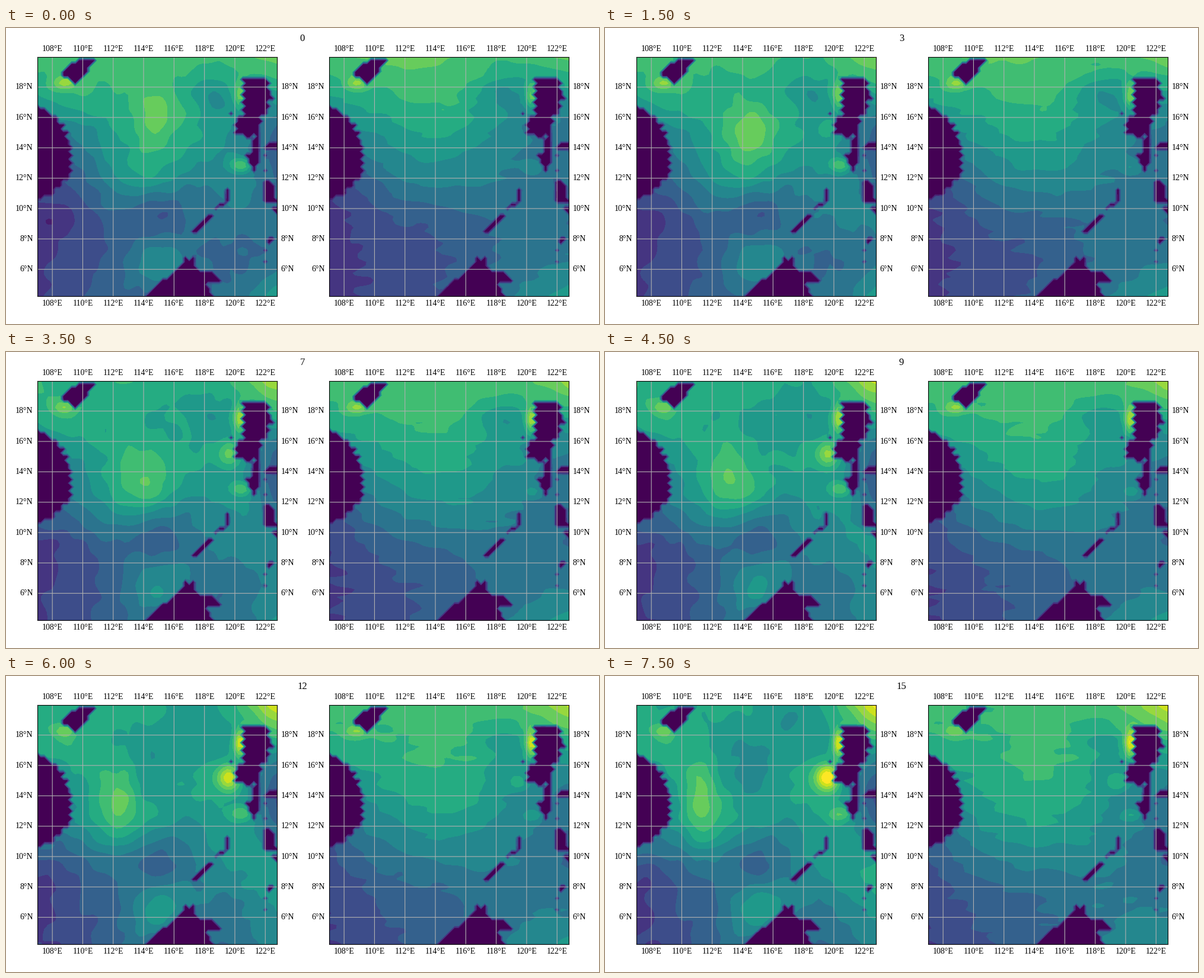
A matplotlib script for the animation above (8 s loop, 1000x500 px).

```python
import numpy as np
import matplotlib.pyplot as plt
from matplotlib.animation import FuncAnimation
from matplotlib.path import Path

plt.rcParams["font.family"] = "Liberation Serif"
FRAMES, STEP_MS = 16, 500
N = 64                                   # quarter-degree samples per side
X0, X1, Y0, Y1 = 52.5, 456.5, 48.5, 452.5
SHIFT = 492                              # distance between the two panels
DEG = (X1 - X0) / 15.75
PAD = 6.94

xs, ys = np.linspace(X0, X1, N), np.linspace(Y0, Y1, N)
gx, gy = np.meshgrid(xs, ys)
LEVELS = [-1, *range(1, 14), 15]
COLORS = plt.get_cmap("viridis")(np.linspace(0, 1, 14))


def land(*corners, tooth=0):
    """Polygon mask; every other row is shifted to give a saw-tooth coast."""
    px = gx + tooth * (np.arange(N) % 2)[:, None]
    inside = Path(corners).contains_points(np.column_stack([px.ravel(), gy.ravel()]))
    return inside.reshape(N, N)


def land_mask():
    mask = land((40, 120), (85, 148), (104, 172), (112, 205), (112, 248),
                (80, 281), (40, 296), tooth=6)
    mask |= land((395, 85), (439, 85), (441, 104), (446, 119), (437, 143),
                 (428, 150), (424, 172), (427, 180), (398, 185), (384, 176),
                 (384, 156), (396, 144), tooth=-6)
    mask |= land((95, 73), (118, 54), (150, 54), (138, 72), (117, 95), (95, 80))
    mask |= land((421, 176), (428, 176), (426, 232), (418, 242), (401, 214),
                 (414, 214))
    mask |= land((434, 202), (444, 194), (458, 193), (458, 209))
    mask |= land((436, 258), (448, 257), (458, 294), (434, 293))
    mask |= land((446, 304), (458, 302), (458, 317))
    mask |= land((442, 370), (443, 354), (458, 354))
    mask |= land((313, 345), (335, 320), (349, 311), (347, 321), (325, 343))
    mask |= land((232, 454), (300, 395), (300, 380), (309, 391), (315, 386),
                 (325, 410), (347, 411), (361, 427), (338, 430), (350, 454))
    islets = [(418, 190), (380, 145), (437, 215), (437, 241), (437, 376),
              (437, 395), (354, 305), (360, 299), (367, 299)]
    islets += [(373, y) for y in range(273, 293, 6)]
    for x, y in islets:
        mask[abs(ys - y).argmin(), abs(xs - x).argmin()] = True
    return mask


def spline(n):
    """Matrix taking n even knots to N samples of a natural cubic spline."""
    k, x = np.linspace(0, 1, n), np.linspace(0, 1, N)
    cube = lambda a: abs(a[:, None] - k) ** 3
    line = lambda a: np.column_stack([np.ones_like(a), a])
    system = np.block([[cube(k), line(k)], [line(k).T, np.zeros((2, 2))]])
    return np.hstack([cube(x), line(x)]) @ np.linalg.inv(system)[:, :n]


def smooth(*rows):
    mesh = np.array(rows, float)
    return spline(mesh.shape[0]) @ mesh @ spline(mesh.shape[1]).T


def bump(x, y, sx, sy):
    return np.exp(-((gx - x) / sx) ** 2 / 2 - ((gy - y) / sy) ** 2 / 2)


LAND = land_mask()
rng = np.random.default_rng(4)
ripple = [smooth(*rng.normal(0, 0.15, (22, 22))) for _ in range(2)]
streak = [smooth(*rng.normal(0, 0.13, (42, 14))) for _ in range(2)]

# First-day background and its change to the last day, north to south
left_start = smooth([9.3, 9.3, 9.8, 9.7, 9.3, 9.8, 10.6],
                    [8, 8.8, 8.6, 8.7, 7.9, 7.4, 7.5],
                    [5, 6.2, 7.8, 8.2, 7.9, 6.7, 4.5],
                    [4, 4.6, 7, 7.7, 6.3, 6.4, 4.8],
                    [2.7, 3.2, 4.6, 4, 5.2, 5.7, 5.7],
                    [2.4, 3.6, 4.4, 6.7, 5.3, 4.8, 5.4],
                    [2.9, 3.7, 4.8, 4.7, 5, 5.8, 7.6])
left_change = smooth([-0.7, -1.6, -1.7, -1.9, 2.8],
                     [1, 0.1, -1.6, 0.8, 0],
                     [3, 2.1, -0.4, 1.4, 0.2],
                     [0.4, 0.8, 0.8, 1.5, 2.8],
                     [0.1, -0.2, 0.5, -0.2, -1.2])
right_start = smooth([9.6, 10.2, 10.2, 9.3, 10.2],
                     [7, 8, 8.6, 6.9, 6],
                     [3.5, 5.6, 6.4, 5.8, 5],
                     [2.4, 3.5, 4.1, 5.2, 5.4],
                     [2.8, 3.4, 4.3, 5.8, 7.5])
right_change = smooth([-0.2, -1, 2.6], [1.5, 1.5, 0.2], [0.1, 0.7, -0.3])

# Local features: x, y, widths, strength on the first and the last day
SHARED = [(99, 93, 13, 8, 2.6, 2), (396, 114, 8, 16, 3.4, 5.4)]
LEFT = SHARED + [(376, 171, 14, 15, 0, 6), (397, 232, 14, 9, 3.4, 2.6),
                 (75, 328, 13, 14, -0.9, -0.3), (350, 118, 18, 20, -0.9, -0.2)]
RIGHT = SHARED + [(342, 108, 26, 15, -1.2, -0.9), (396, 236, 12, 8, 1.4, 1.8),
                  (373, 181, 12, 9, 0, 2)]


def eddy(day):
    """Warm eddy drifting west and stretching north to south."""
    at = lambda *v: np.interp(day, [0, 3, 7, 15], v)
    return at(2.1, 2.8, 2.2, 2.3) * bump(at(255, 245, 232, 163),
                                         at(150, 176, 200, 205),
                                         at(30, 33, 36, 20),
                                         at(38, 34, 40, 52))


def finish(field, spots, noise, u):
    for *shape, first, last in spots:
        field = field + (first + (last - first) * u) * bump(*shape)
    field = field + noise[0] * np.cos(np.pi * u) + noise[1] * np.sin(np.pi * u)
    return np.where(LAND, 0, np.clip(field, 1.2, 14))


def left_field(day):
    u = day / (FRAMES - 1)
    return finish(left_start + left_change * u + eddy(day), LEFT, ripple, u)


def right_field(day):
    u = day / (FRAMES - 1)
    return finish(right_start + right_change * u, RIGHT, streak, u)


fig = plt.figure(figsize=(10, 5), dpi=100, facecolor="white")
title = fig.suptitle("0", fontsize=12)


def panel(shift):
    ax = fig.add_axes([(X0 + shift) / 1000, 1 - Y1 / 500,
                       (X1 - X0) / 1000, (Y1 - Y0) / 500])
    ax.set(xlim=(X0, X1), ylim=(Y1, Y0), xticks=[], yticks=[])
    ax.set_autoscale_on(False)
    grid = dict(color="#b0b0b0", lw=0.8, zorder=2, snap=False)
    for lon in range(108, 123, 2):
        x, text = X0 + (lon - 107) * DEG, f"{lon}°E"
        ax.axvline(x, **grid)
        ax.text(x, Y0 - PAD, text, ha="center", va="bottom")
        ax.text(x, Y1 + PAD, text, ha="center", va="top")
    for lat in range(6, 19, 2):
        y, text = Y0 + (20 - lat) * DEG, f"{lat}°N"
        ax.axhline(y, **grid)
        ax.text(X0 - PAD, y, text, ha="right", va="center")
        ax.text(X1 + PAD, y, text, ha="left", va="center")
    return ax


panels = [(panel(0), left_field), (panel(SHIFT), right_field)]
fills = []


def draw(day):
    while fills:
        fills.pop().remove()
    for ax, field in panels:
        fills.append(ax.contourf(xs, ys, field(day), levels=LEVELS,
                                 colors=COLORS, zorder=1))
    title.set_text(str(day))
    return []


anim = FuncAnimation(fig, draw, frames=FRAMES, init_func=lambda: draw(0),
                     interval=STEP_MS, repeat=True, repeat_delay=0, blit=False)
plt.show()
```
